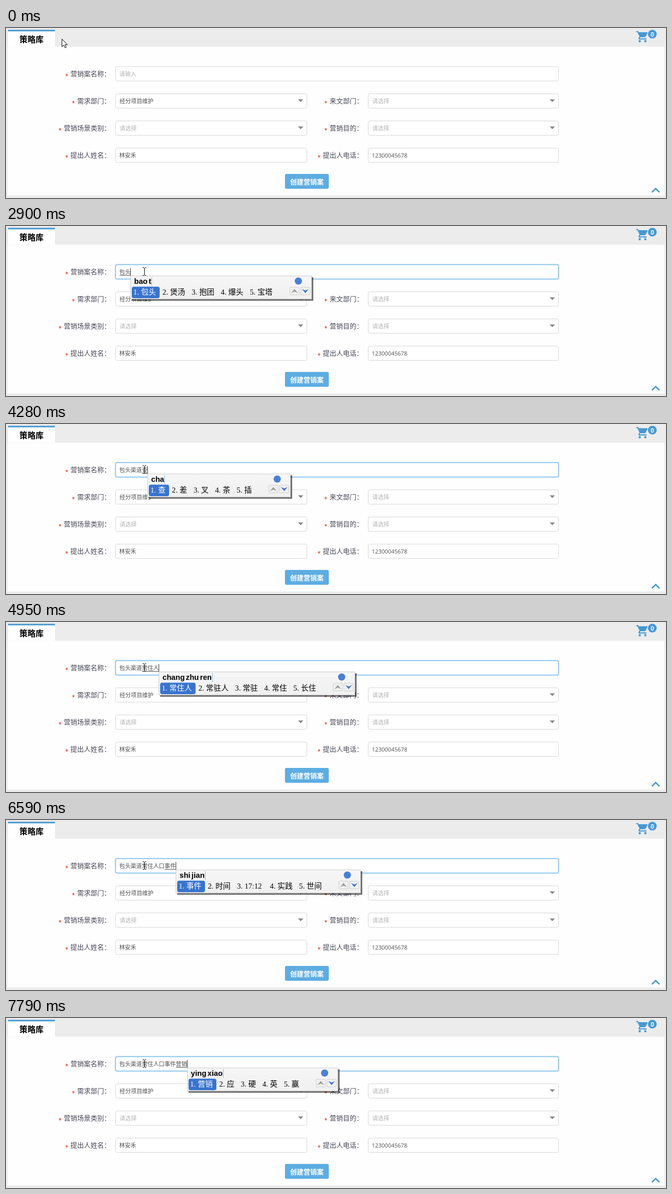
An HTML page that plays this animation: 1280x332 px, repeating every 8000 ms.

```html
<!DOCTYPE html>
<html lang="zh-CN">
<head>
<meta charset="utf-8">
<title>策略库</title>
<style>
html, body { margin: 0; width: 100%; height: 100%; overflow: hidden; background: #ececec; }
svg { display: block; width: 1280px; height: 332px; }
text { font-family: "Noto Sans CJK SC", "Noto Sans CJK", sans-serif; white-space: pre; }
.label { font-size: 13px; fill: #484858; }
.value { font-size: 11px; fill: #505050; letter-spacing: -.05px; }
.digits { font-family: "Open Sans", "Noto Sans", sans-serif; }
.hint { font-size: 11px; fill: #b4b4b8; }
.star { font: 14px "Liberation Sans", sans-serif; fill: #f02800; }
.box { fill: #fff; stroke: #d6d6da; }
.pinyin { font: bold 14.67px "Liberation Sans", Arial, sans-serif; word-spacing: -1.9px; }
.cand { font-size: 14.67px; font-weight: 300; }
.num { font: 14.67px "Liberation Serif", serif; }
.popup { filter: drop-shadow(3px 3px .7px rgba(0, 0, 0, .55)); }
</style>
</head>
<body>
<svg viewBox="0 0 1280 332">
  <defs>
    <linearGradient id="sheen" x2="0" y2="1"><stop stop-color="#f6f6f6"/><stop offset="1" stop-color="#f0f0f0"/></linearGradient>
  </defs>
  <path fill="#fefefe" d="M3 36.5H1277V327H3z"/>
  <path fill="#fff" d="M4 4H95V36.5H4z"/>
  <path fill="#4799cf" d="M4 3.5H95V6.5H4z"/>
  <text x="26" y="28.3" font-size="15.7" font-weight="700">策略库</text>
  <g fill="#4598d2">
    <g transform="translate(1221.3 3.8) scale(1.1)">
      <path d="M1 2V4H3L6.6 11.6L5.2 14Q4 17 7 17H19V15H7.4Q7 15 7.2 14.6L8.1 13H15.6Q16.8 13 17.3 12L20.9 5.5Q21 4 20 4H5.2L4.3 2z"/>
      <circle cx="7" cy="20" r="2"/><circle cx="17" cy="20" r="2"/>
    </g>
    <circle cx="1253.5" cy="12" r="8.5"/>
  </g>
  <path fill="none" stroke="#4598d2" stroke-width="2.6" d="M1252.7 320.8L1260 313.6L1267.3 320.8"/>
  <text x="1253.5" y="16.5" text-anchor="middle" font-size="12" font-weight="700" fill="#fff">0</text>
  <g id="form"></g>
  <rect x="541" y="285" width="85" height="29" rx="3" fill="#5dade2"/>
  <text x="551" y="304.8" font-size="13" font-weight="700" fill="#fff">创建营销案</text>
  <g id="live"></g>
</svg>
<script>
const LOOP = 8000, EM = 14.667, START = 220, STEP = 10.95;
const $ = id => document.getElementById(id);
const txt = (x, y, cls, s, extra = '') => `<text x="${x}" y="${y}" class="${cls}" ${extra}>${s}</text>`;

// label, label x, row, field left, field right, kind, text
const fields = [
  ['营销案名称', 125, 0, 212, 1072, 'input', ''],
  ['需求部门', 138, 1, 212, 584, 'select', '经分项目维护'],
  ['来文部门', 627.5, 1, 702, 1072, 'select', ''],
  ['营销场景类别', 112, 2, 212, 584, 'select', ''],
  ['营销目的', 627.5, 2, 702, 1072, 'select', ''],
  ['提出人姓名', 125, 3, 212, 584, 'input', '林安禾'],
  ['提出人电话', 614.5, 3, 702, 1072, 'input', '12300045678']
];

$('form').innerHTML = fields.map(([label, lx, row, x, end, kind, value]) => {
  const y = 75 + row * 53;
  let out = txt(lx - 10, y + 23.5, 'star', '*') + txt(lx, y + 18.5, 'label', label + '：') +
    `<rect class="box" x="${x + .5}" y="${y + .5}" width="${end - x - 1}" height="28" rx="3"/>`;
  if (kind == 'select')
    out += `<path fill="#888" d="M${end - 17.5} ${y + 11.3}h10l-5 5.5z"/>`;
  const tx = x + (kind == 'select' ? 8.3 : 7.5);
  if (value) out += txt(tx, y + 19.2, /\d/.test(value) ? 'value digits' : 'value', value);
  else if (kind == 'select') out += txt(tx, y + 19.2, 'hint', '请选择');
  return out;
}).join('');

// time, committed text, composing text, pinyin, candidates
const A = '包头', B = A + '渠道', C = B + '常住人口', D = C + '事件';
const typing = [
  [0, '', '', ''],
  [2360, '', '不', 'b', '不 把 吧 被 本'],
  [2480, '', '吧', 'ba', '吧 把 八 爸 罢'],
  [2620, '', '包', 'bao', '包 报 保 抱 宝'],
  [2900, '', A, 'bao t', '包头 煲汤 抱团 爆头 宝塔'],
  [3030, '', A, 'bao to', '包头 爆头 报头 抱头 宝塔'],
  [3170, '', A, 'bao tou', '包头 爆头 报头 抱头 包'],
  [3550, A, '', ''],
  [3700, A, '去', 'q', '去 前 起 请 全'],
  [3850, A, '去', 'qu', '去 取 区 曲 趣'],
  [3980, A, '渠道', 'qu d', '渠道 取得 去掉 取代 区段'],
  [4130, B, '从', ''],
  [4280, B, '查', 'cha', '查 差 叉 茶 插'],
  [4410, B, '产', 'chan', '产 颤 缠 铲 禅'],
  [4560, B, '常住', 'chang z', '常住 常在 长者 长子 常驻'],
  [4700, B, '常住', 'chang zhu', '常住 常驻 长住 厂主 场主'],
  [4820, B, '常住人', 'chang zhu r', '常住人 常驻人 常驻 常住 长住'],
  [4940, B, '常住人', 'chang zhu ren', '常住人 常驻人 常驻 常住 长住'],
  [5060, B, '常住人口', 'chang zhu ren k', '常住人口 常驻人口 常住人 常驻人 常驻'],
  [5190, B, '常住人口', 'chang zhu ren kou', '常住人口 常驻人口 常驻 常住 长住'],
  [5920, C, '', ''],
  [6200, C, '是', 's', '是 说 上 三 所'],
  [6340, C, '是', 'shi', '是 时 事 使 市'],
  [6470, C, '时间', 'shi j', '时间 事件 世界 实践 17:12'],
  [6590, C, '事件', 'shi jian', '事件 时间 17:12 实践 世间'],
  [7010, D, '', ''],
  [7130, D, '有', 'y', '有 一 也 要 用'],
  [7280, D, '一', 'yi', '一 以 已 意 亿'],
  [7410, D, '因', 'yin', '因 引 音 银 印'],
  [7550, D, '应', 'ying', '应 硬 英 赢 影'],
  [7670, D, '营销', 'ying x', '营销 影响 应 硬 英'],
  [7790, D, '营销', 'ying xiao', '营销 应 硬 英 赢']
];
// time, x, y of the arrow pointer
const pointer = [[0, 108, 21], [830, 199, 37], [980, 246, 62], [1100, 258, 72]];
// time, strength of the focus ring
const focus = [[0, 0], [1250, .35], [1370, .75], [1490, 1]];
const at = (list, t) => list.findLast(e => e[0] <= t);
const caretHidden = t => t < 1250 || t >= 1790 && t < 2360 || t >= 5780 && t < 5920;

function popup(left, pinyin, list) {
  let x = left + 6, items = '';
  list.split(' ').forEach((word, i) => {
    const w = EM * (1 + (/\d/.test(word) ? word.length / 2 : word.length));
    const fill = i ? '#000' : '#fff';
    if (!i) items += `<rect x="${left + 3}" y="118.5" width="${w + 10}" height="22.5" rx="4" fill="#3874cf"/>`;
    items += txt(x, 134, 'num', i + 1 + '.', `fill="${fill}"`) +
      txt(x + EM, 134, /\d/.test(word) ? 'num' : 'cand', word, `fill="${fill}"`);
    x += w + 12.5;
  });
  const right = Math.round(x + 63);
  const button = (bx, sign, fill) =>
    `<rect x="${bx + .5}" y="119.5" width="18" height="15" rx="1.5" fill="#f0f0f0" stroke="#d0d0d0"/>
     <path fill="${fill}" d="M${bx + 3} ${127 + 4 * sign}l6.5 ${-8 * sign}l6.5 ${8 * sign}l-6.5 ${-3 * sign}z"/>`;
  return `<rect class="popup" x="${left + .5}" y="97.5" width="${right - left - 1}" height="45" fill="url(#sheen)" stroke="#cdcdcd"/>
    ${txt(left + 7.5, 113, 'pinyin', pinyin)}<path id="mark" stroke="#7ab8e6" d=""/>
    <circle cx="${right - 26}" cy="107.5" r="7" fill="#4a7fd6"/>
    ${items}${button(right - 43, 1, '#999')}${button(right - 22, -1, '#3874cf')}`;
}

function draw(t) {
  const [, done, draft, pinyin, list] = at(typing, t);
  const ring = at(focus, t)[1], n = done.length + draft.length;
  const end = Math.floor(START + STEP * n);
  let out = '';
  if (ring) out += `<g fill="none" stroke="#66b5e8" opacity="${ring}">
    <rect x="212" y="75" width="860" height="29" rx="3.5" stroke-width="3" opacity=".25"/>
    <rect x="212.5" y="75.5" width="859" height="28" rx="3"/></g>`;
  out += n ? txt(219.7, 94.2, 'value', done + draft) : txt(219.7, 94.2, 'hint', '请输入');
  if (draft) out += `<path stroke="#505050" d="M${START + STEP * done.length} 96.5H${end}"/>`;
  if (!caretHidden(t)) out += `<path stroke="#333" d="M${end + .5} 82V97"/>`;
  if (t < 1250) {
    const [, x, y] = at(pointer, t);
    out += `<path transform="translate(${x + .5} ${y + .5})" fill="#fff" stroke="#000" d="M0 0V15L3.5 11.8L6 17.2L8.3 16.2L6 11H10.5z"/>`;
  } else {
    out += '<path fill="none" stroke="#000" d="M265 81.5h2.5l1 1l1-1H272M268.5 82V96M265 96.5h2.5l1-1l1 1H272"/>';
  }
  if (pinyin) out += popup(end, pinyin, list);
  $('live').innerHTML = out;
  if (pinyin) {
    const x = Math.round(end + 8 + document.querySelector('.pinyin').getComputedTextLength()) + .5;
    $('mark').setAttribute('d', `M${x} 100V117`);
  }
}

const origin = performance.now();
let shown = '';
function tick(now) {
  const t = Math.max(0, now - origin) % LOOP;
  const key = [at(typing, t)[0], at(pointer, t)[0], at(focus, t)[0], caretHidden(t)].join();
  if (key != shown) draw(t);
  shown = key;
  requestAnimationFrame(tick);
}
tick(origin);
</script>
</body>
</html>
```
